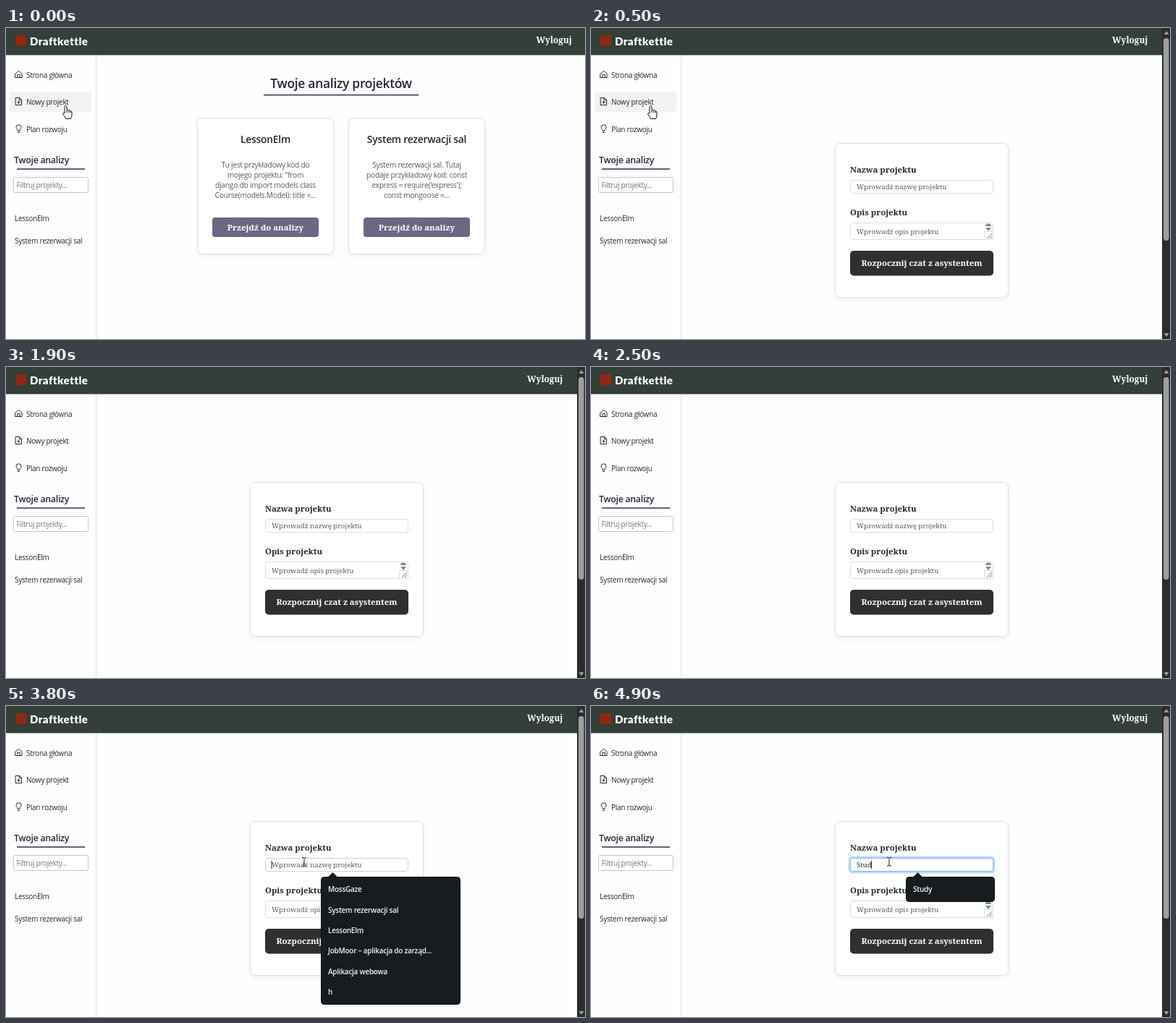
An HTML page that plays this animation: 800x430 px, repeating every 5000 ms.

```html
<!DOCTYPE html>
<html lang="pl">
<head>
<meta charset="utf-8">
<style>
html, body { margin: 0; width: 100%; height: 100%; overflow: hidden; background: #fefefe; }
svg { display: block; width: 800px; height: 430px; font: 10px "Open Sans", "Noto Sans", sans-serif; letter-spacing: -.026em; fill: #25282c; }
.slab { font: 600 11.4px "Noto Serif", serif; letter-spacing: 0; }
.semi { font-weight: 600; }
.mid { text-anchor: middle; }
.white { fill: #fff; }
.gray { fill: #5c5c5c; }
.body { font-size: 10.25px; }
.field { font: 500 9.6px "Noto Serif", serif; letter-spacing: 0; }
.logo { font: 900 15px Lato, sans-serif; letter-spacing: .03em; }
.card { fill: #fff; stroke: #dcdee2; filter: drop-shadow(0 2px 3px #0001); }
.box { fill: #fff; stroke: #d9dde4; }
.icon { fill: none; stroke: #25282c; stroke-linecap: round; stroke-linejoin: round; }
.rule { fill: #5c667d; }
.menu { font-weight: 600; fill: #f2f3f3; }
.panel { fill: #171c1f; stroke: #111618; }
</style>
</head>
<body>
<svg viewBox="0 0 800 430">
  <rect width="800" height="430" fill="#fefefe"/>
  <rect width="800" height="37.500" fill="#333f38"/>
  <rect x="13" y="10" width="15" height="15" rx="1" fill="#8f2815"/>
  <text x="33" y="24" class="logo white">Draftkettle</text>
  <text id="logout" y="21" class="slab white" style="font-size:11.8px">Wyloguj</text>

  <path d="M124.5 38V430" stroke="#dcdfe3"/>
  <rect id="hover" x="5" y="88" width="113" height="28" rx="2" fill="#f2f2f3"/>
  <g class="icon">
    <path d="M13 63.200L17.500 59.300L22 63.200V68.500H13ZM15.800 68.500V64.500H19.200V68.500"/>
    <path d="M13.500 96.500H18.500L21.500 99.500V106.500H13.500ZM18.300 96.500V99.700H21.500M17.500 101V104.500M15.700 102.800H19.300"/>
    <path d="M16 142V140.500C14.800 139.500 14 138.800 14 137.300A3.500 3.500 0 0 1 21 137.300C21 138.800 20.200 139.500 19 140.500V142ZM16.300 144.500H18.700"/>
  </g>
  <text x="28" y="68.500">Strona główna</text>
  <text x="28" y="106">Nowy projekt</text>
  <text x="28" y="144">Plan rozwoju</text>
  <text x="11" y="187" class="semi" font-size="12.300">Twoje analizy</text>
  <rect x="15" y="194" width="94" height="2" class="rule"/>
  <rect x="10.500" y="206.500" width="103" height="21" rx="2" class="box" style="stroke:#c4c7cb"/>
  <text x="14.500" y="221" fill="#757575">Filtruj projekty...</text>
  <text x="12" y="267">LessonElm</text>
  <text x="12" y="297.500">System rezerwacji sal</text>

  <g id="home">
    <text x="463" y="83" class="semi mid" font-size="17.400">Twoje analizy projektów</text>
    <rect x="356" y="91.500" width="214" height="2.200" class="rule"/>
    <g id="cards"></g>
  </g>

  <g id="form">
    <rect x="337.500" y="159.500" width="239" height="213" rx="7" class="card"/>
    <text x="358" y="199.500" class="slab">Nazwa projektu</text>
    <rect id="ring" x="357" y="209" width="200" height="21" rx="4.500" fill="none" stroke="#bfd8fd" stroke-width="3"/>
    <rect id="name" x="358.500" y="210.500" width="197" height="18" rx="3" class="box"/>
    <text id="value" x="367" y="223" class="field"></text>
    <path id="caret" d="M0 214V225" stroke="#222"/>
    <text x="358" y="259" class="slab">Opis projektu</text>
    <rect x="358.500" y="269.500" width="197" height="23" rx="3" class="box"/>
    <text x="367" y="285" class="field gray">Wprowadź opis projektu</text>
    <path d="M545 274Q545 270.500 549 270.500T553 274ZM545 276H553L549 281Z" fill="#868686"/>
    <rect x="543.500" y="281.500" width="12" height="11" class="box"/>
    <path d="M547 291L554 284M551 291L554 288" stroke="#777"/>
    <rect x="358" y="308" width="198" height="34.500" rx="5" fill="#303030"/>
    <text x="457" y="329" class="slab white mid">Rozpocznij czat z asystentem</text>
    <g id="menu" class="menu"></g>
    <rect x="789" width="11" height="430" fill="#2c2c2c"/>
    <rect x="791" y="14" width="7.500" height="280" rx="3.700" fill="#9e9e9e"/>
    <path d="M791.500 9L795 4L798.500 9ZM791.500 422L795 427L798.500 422Z" fill="#9e9e9e"/>
  </g>

  <path id="hand" d="M81 118V109.300Q81 107.500 82.500 107.500T84 109.300V113.500Q86 112.500 86.700 114Q88.500 113.300 89 115Q91 114.700 91 116.800V120Q91 122.500 89.500 125.500H82.500Q81.500 122.500 78.700 119.300Q78 116.500 81 118ZM84 114V117M86.700 114.500V117M89 115.500V117.500" fill="#fff" stroke="#111"/>
  <path id="beam" d="M409 209.500H411L412 210.500L413 209.500H415M412 210.500V220M409 221H411L412 220L413 221H415" fill="none" stroke="#222"/>
</svg>
<script>
const $ = id => document.getElementById(id);
const show = (id, on) => $(id).style.display = on ? "" : "none";

function card(x, title, lines) {
  const mid = x + 94.5;
  return `<rect x="${x + .5}" y="124.5" width="188" height="188" rx="7" class="card"/>
    <text x="${mid}" y="159" class="semi mid" font-size="13.9">${title}</text>` +
    lines.map((s, i) => `<text x="${mid}" y="${192.5 + 14 * i}" class="body gray mid">${s}</text>`).join("") +
    `<rect x="${x + 21}" y="262" width="147" height="27" rx="4" fill="#6b6883"/>
    <text x="${mid}" y="279.5" class="slab white mid">Przejdź do analizy</text>`;
}
$("cards").innerHTML =
  card(264, "LessonElm", ["Tu jest przykładowy kod do", 'mojego projektu: "from',
    "django.db import models class", "Course(models.Model): title =..."]) +
  card(473, "System rezerwacji sal", ["System rezerwacji sal. Tutaj", "podaje przykładowy kod: const",
    "express = require('express');", "const mongoose =..."]);

const menu = (w, h, r, items) =>
  `<path d="M444.500 237L451.500 230L458.500 237Z" fill="#171c1f"/>
  <rect x="435.500" y="236.500" width="${w}" height="${h}" rx="${r}" class="panel"/>` +
  items.map((s, i) => `<text x="445" y="${257.3 + 28.3 * i}">${s}</text>`).join("");
const names = ["MossGaze", "System rezerwacji sal", "LessonElm",
  "JobMoor – aplikacja do zarząd...", "Aplikacja webowa", "h"];
const menus = [
  [4500, menu(122, 34, 4, ["Study"])],
  [4300, menu(142, 67, 0, names.slice(0, 2))],
  [3800, menu(192, 176, 4, names)],
  [0, ""]
];

const CLICK = 3800, keys = [4300, 4500, 4600, 4800];
let lastMenu;

function draw(t) {
  const form = t >= 300, focus = t >= CLICK;
  show("home", !form);
  show("form", form);
  $("logout").setAttribute("x", form ? 720 : 732.5);
  show("hover", t < 700);
  show("hand", t < 700);
  show("beam", t >= 3700);

  const typed = "Stud".slice(0, keys.filter(k => t >= k).length);
  const value = $("value");
  value.textContent = typed || "Wprowadź nazwę projektu";
  value.style.fill = typed ? "#25282c" : "#5c5c5c";
  show("caret", focus);
  const end = typed && form ? value.getComputedTextLength() : 0;
  $("caret").setAttribute("transform", `translate(${367 + end} 0)`);

  const glow = Math.max(0, Math.min(1, (t - CLICK) / 150));
  $("ring").style.opacity = glow;
  $("name").style.stroke = focus ? `rgb(${200 - 66 * glow},${209 - 26 * glow},${225 + 15 * glow})` : "";

  const html = menus.find(m => t >= m[0])[1];
  if (html !== lastMenu) $("menu").innerHTML = lastMenu = html;
}

const start = performance.now();
function tick() {
  draw((performance.now() - start) % 5000);
  requestAnimationFrame(tick);
}
tick();
</script>
</body>
</html>
```
